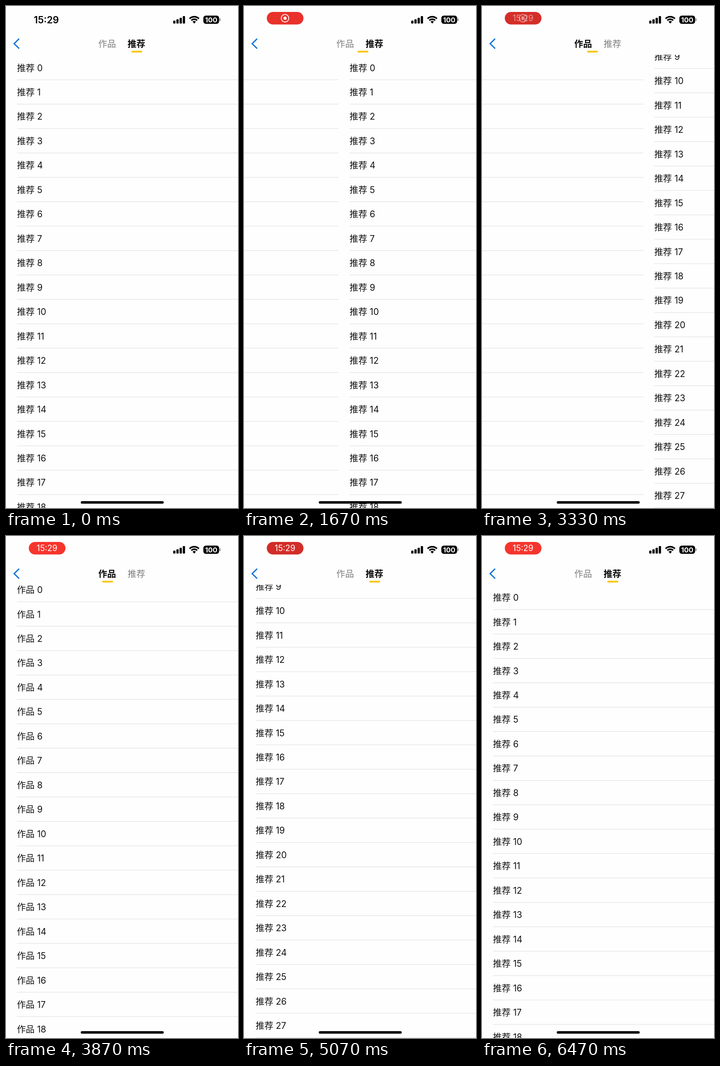
Write an HTML page with a canvas that moves like this. It is 509 by 1100 pixels and loops after 6600 ms.

```html
<!DOCTYPE html>
<html lang="zh">
<head>
<meta charset="utf-8">
<style>
  html, body { margin: 0; width: 100%; height: 100%; overflow: hidden; background: #fefefe; }
  canvas { display: block; }
</style>
</head>
<body>
<canvas id="stage" width="509" height="1100"></canvas>
<script>
const W = 509, H = 1100, LOOP = 6600, ROW = 53.47, LIST_TOP = 107;
const FONT = "Inter, 'Noto Sans CJK SC', 'Noto Sans CJK', sans-serif";
const ctx = document.getElementById('stage').getContext('2d');

// Each move: [start ms, distance, time constant]
const PAGE = [[825, -1, 70], [1555.4, 1, 58], [3190.8, -1, 58], [4605, 1, 58]];
const WORKS_SCROLL = [[3850, 602.3, 80]];
const PICKS_SCROLL = [[2260, 506, 92.7], [5230, -506, 130]];

// Critically damped approach from 0 to 1
function settle(t, tau) {
  const x = Math.max(0, t / tau);
  return 1 - (1 + x) * Math.exp(-x);
}
const follow = (moves, t, from = 0) =>
  moves.reduce((sum, [start, dist, tau]) => sum + dist * settle(t - start, tau), from);

function fade(t, from, to) {
  const p = Math.min(1, Math.max(0, (t - from) / (to - from)));
  return p * p * (3 - 2 * p);
}

function text(str, x, y, size, weight, color, align = 'left') {
  ctx.font = `${weight} ${size}px ${FONT}`;
  ctx.fillStyle = color;
  ctx.textAlign = align;
  ctx.fillText(str, x, y);
}

function box(x, y, w, h, r, color) {
  ctx.fillStyle = color;
  ctx.beginPath();
  ctx.roundRect(x, y, w, h, r);
  ctx.fill();
}

function ring(x, y, r, width, color, a = 0, b = 2 * Math.PI) {
  ctx.strokeStyle = color;
  ctx.lineWidth = width;
  ctx.beginPath();
  ctx.arc(x, y, r, a, b);
  ctx.stroke();
}

function withAlpha(alpha, draw) {
  if (alpha <= 0) return;
  ctx.save();
  ctx.globalAlpha *= alpha;
  draw();
  ctx.restore();
}

function list(label, left, scroll) {
  if (left <= -W || left >= W) return;
  ctx.save();
  ctx.beginPath();
  ctx.rect(left, LIST_TOP, W, H - LIST_TOP);
  ctx.clip();
  for (let i = 0; i < 50; i++) {
    const y = i * ROW - scroll;
    if (y < -80 || y > H) continue;
    text(`${label} ${i}`, left + 24, y + 142.5, 19.4, 400, '#111');
    ctx.fillStyle = '#e2e2e4';
    ctx.fillRect(left + 24, y + 161, W - 24, 1.2);
  }
  ctx.restore();
}

function tabs(page) {
  ['作品', '推荐'].forEach((name, i) => {
    const on = Math.round(page) === i;
    text(name, 202.5 + 64.3 * i, 90.2, 19.4, on ? 600 : 500, on ? '#0a0a0a' : '#7f7f7f');
  });
  box(211 + 64 * page, 98, 24, 4, 2, '#f9c812');
}

function recordPill(t) {
  const shown = fade(t, 70, 520), time = fade(t, 3230, 3430);
  withAlpha(1 - shown, () => text('15:29', 88.5, 38.2, 21, 600, '#000', 'center'));
  withAlpha(shown, () => {
    const glow = 0.5 + 0.5 * Math.cos((t - 4170) * Math.PI / 1000);
    const mix = (a, b) => Math.round(a + (b - a) * glow);
    box(50, 13, 80.5, 27.5, 13.75, `rgb(${mix(209, 255)},${mix(45, 55)},${mix(40, 46)})`);
    withAlpha(1 - time, () => {
      ring(90, 26.7, 8.3, 1.8, '#fff');
      box(86.5, 23.2, 7, 7, 3.5, '#fff');
    });
    withAlpha(time, () => text('15:29', 90, 33.2, 18, 400, '#fff', 'center'));
  });
}

function statusIcons() {
  [6.5, 9.5, 12.8, 16.5].forEach((h, i) => box(366.8 + 7 * i, 38.5 - h, 5, h, 1.5, '#000'));
  const a = -Math.PI * 0.75, b = -Math.PI * 0.25;
  ring(413, 38, 14.5, 3.4, '#000', a, b);
  ring(413, 38, 9, 3.4, '#000', a, b);
  ctx.fillStyle = '#000';
  ctx.beginPath();
  ctx.moveTo(413, 38.5);
  ctx.arc(413, 38, 5.2, a, b);
  ctx.fill();
  box(433, 21, 34.5, 18, 5.5, '#000');
  box(468.5, 27, 2, 6, 1, '#777');
  text('100', 450.2, 35.6, 15.2, 700, '#fff', 'center');
}

function backArrow() {
  ctx.strokeStyle = '#0b72dc';
  ctx.lineWidth = 2.7;
  ctx.beginPath();
  ctx.moveTo(28.8, 71.8);
  ctx.lineTo(17.8, 82.5);
  ctx.lineTo(28.8, 93.2);
  ctx.stroke();
}

function draw(t) {
  const page = follow(PAGE, t, 1);
  ctx.fillStyle = '#fefefe';
  ctx.fillRect(0, 0, W, H);
  list('作品', -page * W, follow(WORKS_SCROLL, t));
  list('推荐', (1 - page) * W, follow(PICKS_SCROLL, t));
  tabs(page);
  backArrow();
  recordPill(t);
  statusIcons();
  box(164, 1085, 182, 5.6, 2.8, '#000');
}

const begin = performance.now();
function tick() {
  draw((performance.now() - begin) % LOOP);
  requestAnimationFrame(tick);
}
tick();
</script>
</body>
</html>
```
